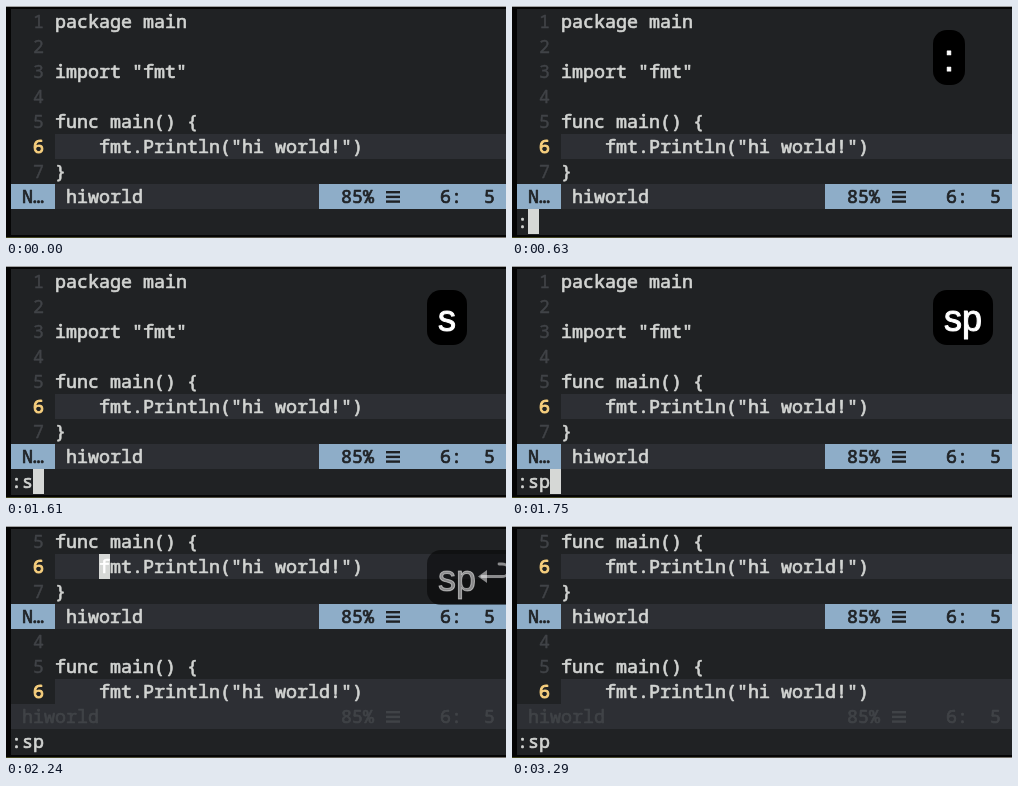
Animation of 500 by 232 pixels, one loop 3570 ms. Source, as an HTML page with a canvas:

```html
<!DOCTYPE html>
<html lang="en">
<head>
<meta charset="utf-8">
<title>Splitting a window</title>
<style>
html, body { margin: 0; width: 100%; height: 100%; overflow: hidden; background: #000; }
canvas { display: block; }
</style>
</head>
<body>
<canvas id="stage" width="500" height="232"></canvas>
<script>
const ctx = document.getElementById('stage').getContext('2d');
const LOOP = 3570, STEP = 70;
const LEFT = 5, TOP = 3, CELL = 11, ROW = 25;
const MONO = '18.33px "Noto Sans Mono", "DejaVu Sans Mono", monospace';
const KEYS = '36px "Liberation Sans", Arial, sans-serif';
const C = {
  bg: '#202224', line: '#2d2f34', dim: '#404347', text: '#d2d4d2',
  current: '#f9d17f', bar: '#8eadc8', ink: '#1f2225', cursor: '#d6d8d6'
};
const SOURCE = ['package main', '', 'import "fmt"', '', 'func main() {',
  '    fmt.Println("hi world!")', '}'];

// Times of the typed keys and of the window split
const COLON = 560, KEY_S = 1610, KEY_P = 1680, ENTER = 2170, SPLIT = 2240;

const BLINK = [[0, 0], [210, 1], [420, 1], [560, 0], [2239, 0], [2240, 1],
  [2380, 0], [2590, 0], [2800, 1], [3010, 1], [3290, 0], [LOOP, 0]];
const FADE = [[0, 1], [1049, 1], [1050, .9], [1120, .5], [1190, .2], [1260, 0],
  [1609, 0], [1610, 1], [2169, 1], [2170, .92], [2240, .5], [2310, .2], [2380, 0], [LOOP, 0]];

ctx.lineJoin = ctx.lineCap = 'round';

const colX = col => LEFT + col * CELL;
const rowY = row => TOP + row * ROW;

function ramp(points, t) {
  const i = points.findIndex(p => p[0] >= t);
  if (i <= 0) return points[0][1];
  const [t0, a] = points[i - 1], [t1, b] = points[i];
  return a + (b - a) * (t - t0) / (t1 - t0);
}

function fill(x, y, w, h, color) {
  ctx.fillStyle = color;
  ctx.fillRect(x, y, w, h);
}

// Text with a thin outline, for a medium weight
function label(str, x, y, font, color, outline) {
  ctx.font = font;
  ctx.fillStyle = ctx.strokeStyle = color;
  ctx.lineWidth = outline;
  ctx.fillText(str, x, y);
  ctx.strokeText(str, x, y);
}

function put(str, col, row, color, outline = .7) {
  label(str, colX(col), rowY(row) + 19, MONO, color, outline);
}

function backdrop() {
  fill(0, 0, 500, 232, '#050505');
  fill(0, 0, 500, 1, '#a0a0a0');
  const g = ctx.createLinearGradient(0, 0, 500, 0);
  g.addColorStop(0, '#45471f');
  g.addColorStop(.5, '#55524a');
  g.addColorStop(1, '#77736c');
  fill(0, 231, 500, 1, g);
  fill(LEFT, TOP, 495, 226, C.bg);
}

function codeLine(num, row) {
  const active = num === 6;
  if (active) fill(colX(4), rowY(row), 500, ROW, C.line);
  put(num, 2, row, active ? C.current : C.dim, active ? 1 : .4);
  put(SOURCE[num - 1], 4, row, C.text);
}

function codeLines(first, last, row) {
  for (let n = first; n <= last; n++) codeLine(n, row + n - first);
}

function statusBar(row, active) {
  const y = rowY(row), ink = active ? C.ink : C.dim;
  fill(LEFT, y, 495, ROW, C.line);
  if (active) {
    fill(LEFT, y, 4 * CELL, ROW, C.bar);
    fill(colX(28), y, 500, ROW, C.bar);
    put('N…', 1, row, ink);
  }
  put('hiworld', active ? 5 : 1, row, active ? C.text : ink);
  put('85%', 30, row, ink);
  for (let i = 0; i < 3; i++) fill(380, y + 7 + i * 4.7, 14, 2.4, ink);
  put('6:', 39, row, ink);
  put('5', 43, row, ink);
}

function blockCursor(col, row, alpha, under = '') {
  ctx.globalAlpha = alpha;
  fill(colX(col), rowY(row), CELL, ROW, C.cursor);
  put(under, col, row, '#fff');
  ctx.globalAlpha = 1;
}

function returnArrow() {
  ctx.strokeStyle = ctx.fillStyle = '#fff';
  ctx.lineWidth = 2.8;
  ctx.beginPath();
  ctx.moveTo(476, 50.5);
  ctx.lineTo(496, 50.5);
  ctx.bezierCurveTo(505, 50.5, 505, 38, 496, 38);
  ctx.lineTo(493, 38);
  ctx.stroke();
  ctx.beginPath();
  ctx.moveTo(472, 50.5);
  ctx.lineTo(481, 44);
  ctx.lineTo(481, 57);
  ctx.fill();
}

function keyBadge(keys, enter, alpha) {
  if (!keys || alpha <= 0) return;
  ctx.font = KEYS;
  const w = ctx.measureText(keys).width + 22 + (enter ? 36 : 0);
  ctx.globalAlpha = alpha;
  ctx.fillStyle = '#000';
  ctx.beginPath();
  ctx.roundRect(421, 24, w, 55, 14);
  ctx.fill();
  label(keys, 432, 65, KEYS, '#fff', 1);
  if (enter) returnArrow();
  ctx.globalAlpha = 1;
}

function draw(t) {
  const split = t >= SPLIT;
  const typed = t >= KEY_P ? 'sp' : t >= KEY_S ? 's' : '';
  backdrop();
  if (split) {
    codeLines(5, 7, 0);
    statusBar(3, true);
    codeLines(4, 6, 4);
    statusBar(7, false);
  } else {
    codeLines(1, 7, 0);
    statusBar(7, true);
  }
  if (t >= COLON) put(':' + typed, 0, 8, C.text);
  if (t >= COLON && !split) blockCursor(1 + typed.length, 8, 1);
  else blockCursor(8, split ? 1 : 5, ramp(BLINK, t), 'f');
  keyBadge(typed || (t >= COLON ? ':' : ''), t >= ENTER, ramp(FADE, t));
}

const start = performance.now();
function tick() {
  const t = (performance.now() - start) % LOOP;
  draw(Math.floor(t / STEP) * STEP);
  requestAnimationFrame(tick);
}
tick();
</script>
</body>
</html>
```
